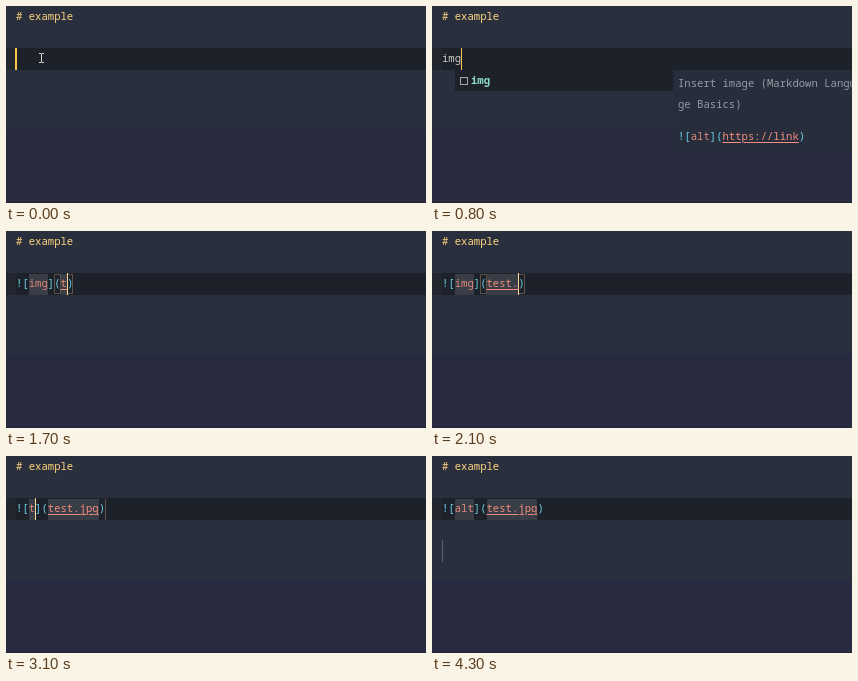
An HTML page for the animation above (4.4 s loop, 420x197 px).

```html
<!DOCTYPE html>
<html lang="en">
<head>
<meta charset="utf-8">
<title>Snippet editing</title>
<style>
  html, body { margin: 0; width: 100%; height: 100%; overflow: hidden; background: #2a2f3d; }
  #stage { position: relative; width: 420px; height: 197px; overflow: hidden;
    font: 500 10.6px/21px "Noto Sans Mono", "DejaVu Sans Mono", monospace; color: #cccac2; }
  #stage div { position: absolute; white-space: pre; box-sizing: border-box; }
  #lower { left: 0; top: 123px; width: 420px; height: 74px; background: #282b3f; border-bottom: 1px solid #202434; }
  #current { left: 0; top: 42px; width: 420px; height: 22px; background: #1d2129; border-left: 10px solid #22262f; }
  #title { left: 10px; top: 0; color: #ffd580; }
  #line { left: 10px; top: 42px; }
  .mark { top: 43px; height: 21px; background: #393d45; }
  .mark.selected { background: #4c5571; border-bottom: 3px solid #566280; }
  .pair { top: 43px; height: 20px; border: 1px solid #5b5148; }
  .stop { top: 43px; height: 21px; width: 1px; background: #65504f; }
  #caret { width: 1px; height: 22px; background: #ffc44c; }
  #pointer { left: 32px; top: 47px; width: 7px; height: 10px; }
  #popup { left: 0; top: 64px; width: 420px; height: 80px; }
  #list { left: 23px; top: 0; width: 218px; background: #282d3a; }
  #details { left: 241px; top: 0; width: 179px; height: 80px; background: #282d3b; color: #969ba6; font-weight: 400; }
  #details div { left: 5px; }
  #list .row { position: relative; height: 21px; padding-left: 16px; color: #a9adb5; }
  #list .row:first-child { background: #1d212a; }
  #list .row::before { content: ""; position: absolute; left: 5px; top: 7px; width: 6px; height: 6px; border: 1px solid #a5a69f; }
  #list b { color: #8bdcc6; }
  #sample { font-weight: 500; }
  .sign { color: #6bd3e8; }
  .alt { color: #e0877b; }
  .url { color: #f28d7e; text-decoration: underline; text-underline-offset: 2px; }
</style>
</head>
<body>
<div id="stage">
  <div id="lower"></div>
  <div id="current"></div>
  <div id="title"># example</div>
  <div id="marks"></div>
  <div id="popup">
    <div id="list"></div>
    <div id="details">
      <div style="top:3px">Insert image (Markdown Langua</div>
      <div style="top:24px">ge Basics)</div>
      <div style="top:56px" id="sample"></div>
    </div>
  </div>
  <div id="caret"></div>
  <div id="line"></div>
  <div id="pointer"><svg width="7" height="10" style="display:block"><path d="M1 .5h2l.5.5.5-.5h2M3.5 1v8M1 9.5h2l.5-.5.5.5h2" fill="none" stroke="#d8d8d2"/></svg></div>
</div>
<script>
const LOOP = 4400, LEFT = 10, CHAR = 6.36;
const PATH = "/Users/linmuwen/code/transfer.md", FILE = "test.jpg";
const el = id => document.getElementById(id);
const x = column => LEFT + column * CHAR;
const show = (id, on) => { el(id).style.display = on ? "block" : "none"; };
const span = (kind, text) => `<span class="${kind}">${text}</span>`;
const link = (alt, url) => span("sign", "![") + span("alt", alt) +
  span("sign", "](") + span("url", url) + span("sign", ")");

const steps = [
  { at: 0, word: "", pointer: true },
  { at: 200, word: "i" },
  { at: 400, word: "im", items: ["image", "img"] },
  { at: 700, word: "img", items: ["img"] },
  { at: 1200, alt: "img", url: PATH, focus: "url", selected: true }
];
for (let n = 1; n <= FILE.length; n++)
  steps.push({ at: 1500 + n * 100 + (n > 1 ? 100 : 0), alt: "img", url: FILE.slice(0, n), focus: "url" });
steps.push({ at: 2700, alt: "img", url: FILE, focus: "alt", selected: true });
[[3000, "t"], [3300, ""], [3400, "a"], [3500, "al"], [3600, "alt"]].forEach(([at, alt]) =>
  steps.push({ at, alt, url: FILE, focus: "alt" }));
steps.push({ at: 3800, alt: "alt", url: FILE, done: true });

function box(kind, from, count) {
  const width = count ? `;width:${count * CHAR}px` : "";
  return `<div class="${kind}" style="left:${x(from)}px${width}"></div>`;
}

function placeCaret(column, top, color = "#ffc44c") {
  const atMargin = column === 0 && top === 42;
  Object.assign(el("caret").style, {
    left: Math.round(x(column)) - (atMargin ? 1 : 0) + "px", top: top + "px",
    width: atMargin ? "2px" : "1px", background: color
  });
}

function draw(s) {
  const plain = s.word !== undefined;
  show("pointer", s.pointer);
  show("popup", s.items);
  show("current", !s.selected);
  show("caret", !s.selected);
  el("line").innerHTML = plain ? s.word : link(s.alt, s.url);
  el("list").innerHTML = (s.items || []).map(item =>
    `<div class="row"><b>${s.word}</b>${item.slice(s.word.length)}</div>`).join("");
  el("marks").innerHTML = "";
  if (plain) return placeCaret(s.word.length, 42);

  const urlStart = 4 + s.alt.length, end = urlStart + s.url.length;
  const mark = (name, start, text) =>
    box("mark" + (s.selected && s.focus === name ? " selected" : ""), start, text.length);
  let marks = (s.alt ? mark("alt", 2, s.alt) : "") + mark("url", urlStart, s.url);
  if (s.focus === "url" && !s.selected) marks += box("pair", urlStart - 1, 1) + box("pair", end, 1);
  else if (!s.done) marks += box("stop", end + 1);
  el("marks").innerHTML = marks;
  if (s.done) placeCaret(0, 84, "#5d6068");
  else placeCaret(s.focus === "url" ? end : 2 + s.alt.length, 42, "#ffd79a");
}

el("sample").innerHTML = link("alt", "https://link");
const began = performance.now();
let shown;
function tick() {
  const time = (performance.now() - began) % LOOP;
  const step = steps.filter(s => s.at <= time).pop() || steps[0];
  if (step !== shown) draw(shown = step);
  requestAnimationFrame(tick);
}
tick();
</script>
</body>
</html>
```
